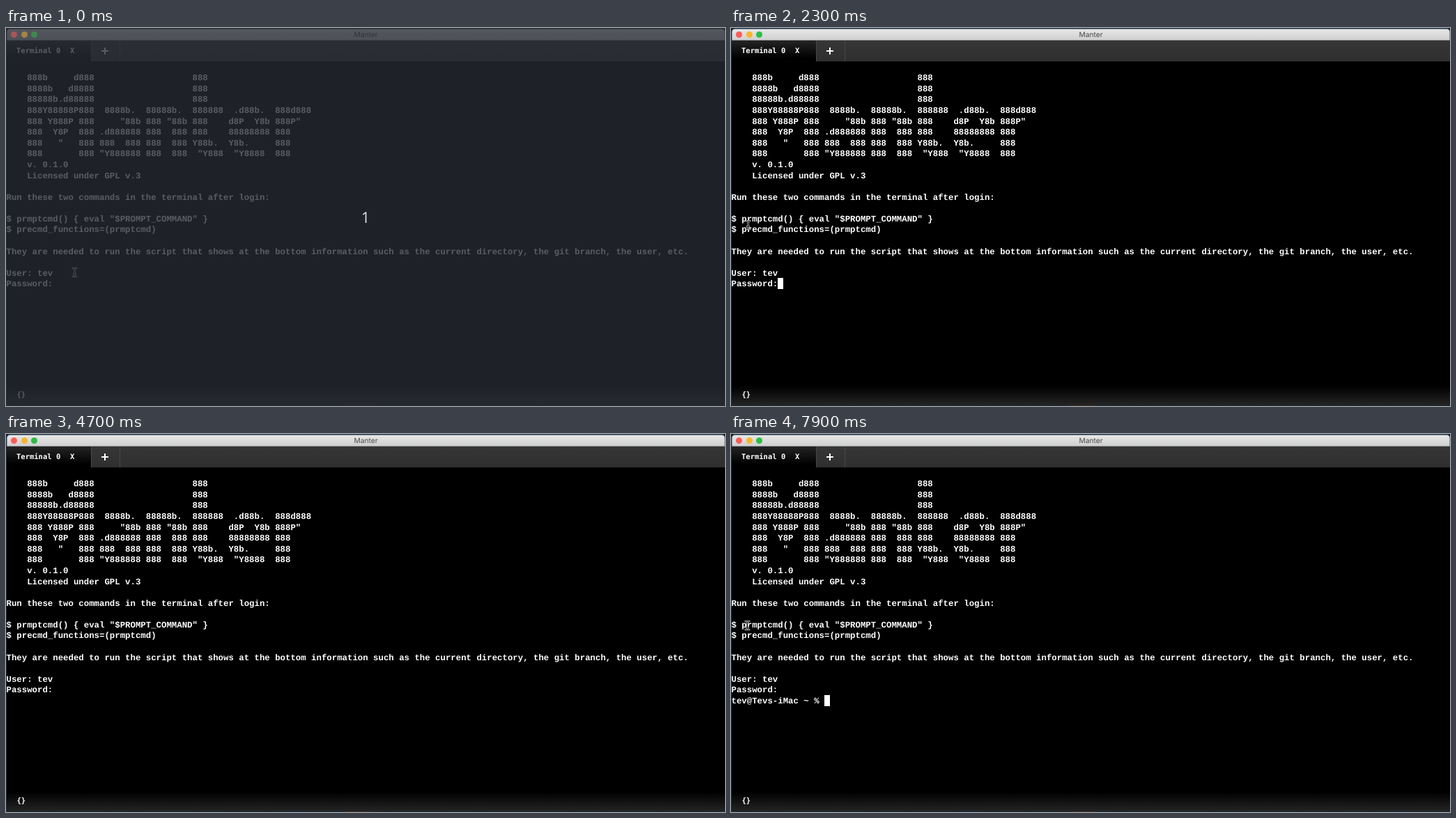
An HTML page that plays this animation: 1032 by 543 pixels, repeating every 8 s.

```html
<!DOCTYPE html>
<html lang="en">
<head>
<meta charset="utf-8">
<title>Manter</title>
<style>
  html, body { margin: 0; width: 100%; height: 100%; overflow: hidden; background: #000; }
  #stage { position: relative; width: 1032px; height: 543px; overflow: hidden; background: #000; text-rendering: geometricPrecision; }
  #stage div, #stage pre, #stage span, #stage svg { position: absolute; box-sizing: border-box; margin: 0; }
  #stage pre, #stage span { white-space: pre; color: #fff; }
  #edge { inset: 0; border: solid #14304a; border-width: 1px 0 0 1px; }
  #title { left: 1px; top: 1px; width: 1031px; height: 17px; border: 1px solid #8b9096; border-radius: 4px 4px 0 0;
    background: linear-gradient(#e7e7e7, #d0d0d0); font: 10.2px/16px Inter, sans-serif; color: #484848; text-align: center; }
  .light { top: 5px; width: 9px; height: 9px; border-radius: 50%; }
  #tabs { left: 1px; top: 18px; width: 1031px; height: 30px; background: linear-gradient(#363636, #2f2f2f); }
  .tab { top: 0; height: 30px; border-right: 1px solid #484848; }
  .ui { font: bold 10.5px/14px "DejaVu Sans Mono", monospace; }
  .plus { background: #fff; }
  #bar { left: 1px; top: 514px; width: 1031px; height: 28px; background: linear-gradient(#000, #242424); }
  #base { left: 0; top: 542px; width: 1032px; height: 1px;
    background: linear-gradient(90deg, #14283a 46.5%, #403020 48%, #403020 50%, #14283a 51.5%); }
  .term { left: .5px; font: bold 12.37px/15.58px "Liberation Mono", monospace; }
  #block { width: 8px; height: 16px; background: #fff; }
  #beam { left: 0; top: 0; width: 1px; height: 1px; overflow: visible; }
  #shade { inset: 0; background: rgba(40, 44, 52, .77); }
  #count { left: 0; top: 257px; width: 1032px; text-align: center; font: 22px/30px "Open Sans", sans-serif; color: #dde0e4; }
</style>
</head>
<body>
<div id="stage">
  <div id="edge"></div>
  <div id="title">Manter</div>
  <div id="tabs">
    <div class="tab" style="left:0;width:122px;background:linear-gradient(#242424,#000 85%)"></div>
    <div class="tab" style="left:122px;width:41px"></div>
  </div>
  <span class="ui" style="left:15px;top:26px">Terminal 0</span>
  <span class="ui" style="left:92px;top:26px">X</span>
  <div class="plus" style="left:137px;top:32px;width:10px;height:2px"></div>
  <div class="plus" style="left:141px;top:28px;width:2px;height:10px"></div>

  <pre class="term" style="top:65.3px">    888b     d888                   888
    8888b   d8888                   888
    88888b.d88888                   888
    888Y88888P888  8888b.  88888b.  888888  .d88b.  888d888
    888 Y888P 888     "88b 888 "88b 888    d8P  Y8b 888P"
    888  Y8P  888 .d888888 888  888 888    88888888 888
    888   "   888 888  888 888  888 Y88b.  Y8b.     888
    888       888 "Y888888 888  888  "Y888  "Y8888  888
    v. 0.1.0
    Licensed under GPL v.3

Run these two commands in the terminal after login:

$ prmptcmd() { eval "$PROMPT_COMMAND" }
$ precmd_functions=(prmptcmd)

They are needed to run the script that shows at the bottom information such as the current directory, the git branch, the user, etc.

User: tev
Password:
<span id="prompt">tev@Tevs-iMac ~ %</span></pre>
  <div id="block"></div>

  <div id="bar"></div>
  <span class="ui" style="left:15.5px;top:520px">{}</span>
  <div id="base"></div>

  <svg id="beam" fill="none" stroke-linecap="round">
    <defs><path id="shape" d="M-2.8-6Q0-6 0-4.5Q0-6 2.8-6M0-4.5V4.5M-2.8 6Q0 6 0 4.5Q0 6 2.8 6M-1.5 2.5H1.5"/></defs>
    <g id="pointer">
      <use href="#shape" stroke="#c4c4c4" stroke-width="2.4"/>
      <use href="#shape" stroke="#000" stroke-width=".9"/>
    </g>
  </svg>

  <div id="shade"><div id="count">1</div></div>
  <div id="lights">
    <div class="light" style="left:7px;background:#fc5b57"></div>
    <div class="light" style="left:21.5px;background:#f6b62f"></div>
    <div class="light" style="left:36px;background:#2bbd45"></div>
  </div>
</div>
<script>
  const LOOP = 8000, STEP = 100, BLINK = 600;
  const ENTER = 4900, LOGIN = 5100;   // password sent, prompt printed
  const HIDE = 3600, RETURN = 7100;   // pointer hidden while typing
  const $ = id => document.getElementById(id);
  const show = (el, on) => el.style.visibility = on ? "visible" : "hidden";

  // Pointer stops: time, x, y
  const stops = [
    [0, 98.5, 351], [1000, 98.5, 351], [1300, 112.5, 284], [2000, 25, 275], [2300, 24.5, 283],
    [2500, 81, 370], [7000, 81, 370], [7650, 8, 281], [7900, 23.5, 275], [LOOP, 23.5, 275]
  ];

  function pointerAt(t) {
    const i = stops.findIndex(s => s[0] > t);
    const [t0, ...a] = stops[i - 1], [t1, ...b] = stops[i];
    const p = (t - t0) / (t1 - t0), ease = p * p * (3 - 2 * p);
    return a.map((v, k) => v + (b[k] - v) * ease);
  }

  // The blink runs one step late while the pointer is busy and restarts at login.
  function blockOn(t) {
    if (t >= ENTER && t < LOGIN) return true;
    const lag = t >= 1700 && t < HIDE ? STEP : 0;
    const since = t - lag - (t < LOGIN ? 500 : LOGIN);
    return since >= 0 && Math.floor(since / BLINK) % 2 === 0;
  }

  function draw(time) {
    const t = Math.floor(time % LOOP / STEP) * STEP;
    const counting = t < STEP;
    show($("shade"), counting);
    $("lights").style.opacity = counting ? .5 : 1;

    show($("prompt"), t >= LOGIN);
    show($("block"), blockOn(t));
    $("block").style.left = (t < ENTER ? 67 : t < LOGIN ? 0 : 134) + "px";
    $("block").style.top = (t < ENTER ? 359 : 374.5) + "px";

    show($("beam"), t < HIDE || t >= RETURN);
    $("pointer").setAttribute("transform", `translate(${pointerAt(t)})`);
  }

  function tick() {
    draw(performance.now());
    requestAnimationFrame(tick);
  }
  tick();
</script>
</body>
</html>
```
